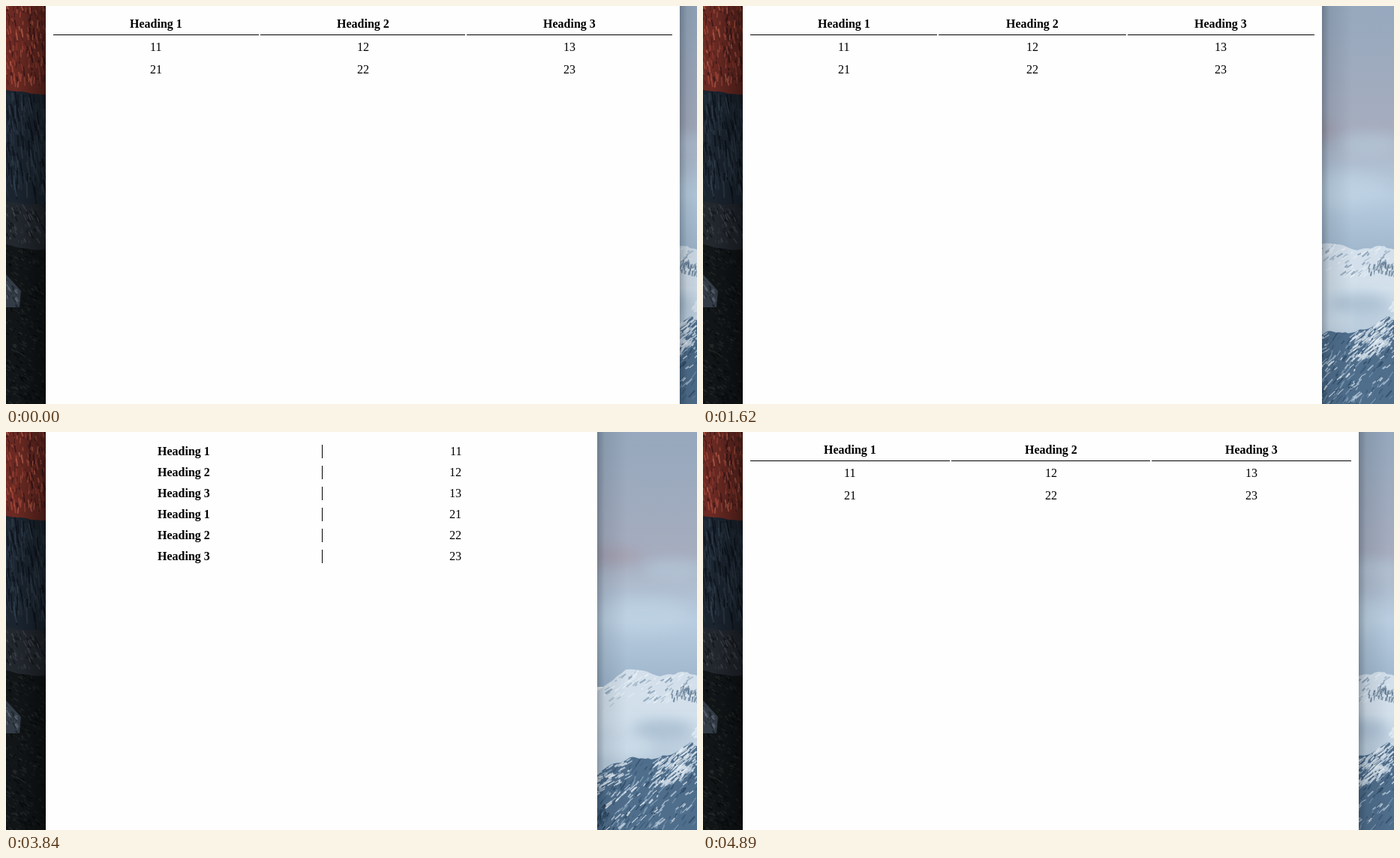
Recreate the animation shown at these times as an HTML page. Size 921 px wide and 531 px high, loop 4990 ms.

```html
<!DOCTYPE html>
<html lang="en">
<head>
<meta charset="utf-8">
<title>Responsive table</title>
<style>
  html, body { margin: 0; width: 100%; height: 100%; overflow: hidden; background: #fefefe; }
  svg { display: block; width: 921px; height: 531px; }
  text { font: 16px "Liberation Serif", "Times New Roman", serif; fill: #000; }
  .head { font-weight: bold; }
</style>
</head>
<body>
<svg id="stage" viewBox="0 0 921 531">
  <defs>
    <linearGradient id="sky" x2="0" y2="1">
      <stop offset="0" stop-color="#96a8bd"/>
      <stop offset=".48" stop-color="#a5adbe"/>
      <stop offset=".74" stop-color="#b8cde0"/>
      <stop offset="1" stop-color="#9db4ca"/>
    </linearGradient>
    <linearGradient id="mist" x2="0" y2="1">
      <stop offset="0" stop-color="#d5e2ed"/>
      <stop offset=".4" stop-color="#b7cadb"/>
      <stop offset="1" stop-color="#c9d9e6"/>
    </linearGradient>
    <linearGradient id="shadeR">
      <stop offset="0" stop-color="#0a1420" stop-opacity=".3"/>
      <stop offset=".25" stop-color="#0a1420" stop-opacity=".1"/>
      <stop offset="1" stop-color="#0a1420" stop-opacity="0"/>
    </linearGradient>
    <linearGradient id="shadeL" x1="1" x2="0">
      <stop offset="0" stop-opacity=".4"/>
      <stop offset="1" stop-opacity="0"/>
    </linearGradient>
    <filter id="soft" x="-50%" y="-50%" width="200%" height="200%"><feGaussianBlur stdDeviation="9"/></filter>
  </defs>
  <g id="photo"></g>
  <rect x="13" width="40" height="531" fill="url(#shadeL)"/>
  <rect id="shade" width="40" height="531" fill="url(#shadeR)"/>
  <rect id="page" x="53" height="531" fill="#fefefe"/>
  <g id="wide"></g>
  <g id="narrow"></g>
</svg>
<script>
const LOOP = 4990, LEFT = 63, BREAK = 820, BOTTOM = 531;

// [start time in ms, right edge of the window]
const steps = [
  [0, 898], [600, 875], [810, 860], [1020, 852], [1260, 843], [1440, 835], [1620, 825],
  [1850, 813], [2000, 808], [2150, 800], [2330, 793], [2460, 789], [2640, 786],
  [3840, 788], [3990, 796], [4130, 810], [4280, 827], [4490, 856], [4720, 870], [4890, 874]
];

const $ = id => document.getElementById(id);
const photo = $("photo"), wideTable = $("wide"), narrowTable = $("narrow");

function set(el, attrs) {
  for (const k in attrs) el.setAttribute(k, attrs[k]);
  return el;
}

function add(parent, tag, attrs) {
  return parent.appendChild(set(document.createElementNS("http://www.w3.org/2000/svg", tag), attrs));
}

function label(parent, y, content, cls = "") {
  const el = add(parent, "text", { y, class: cls });
  el.textContent = content;
  const half = el.getComputedTextLength() / 2;
  return center => set(el, { x: Math.round(center - half) });
}

let seed = 7;
const rand = (a, b) => {
  seed = (seed * 16807) % 2147483647;
  return a + (b - a) * seed / 2147483647;
};

// A jagged skyline through a few key points, filled down to the bottom.
function ridge(fill, rough, points) {
  let line = points;
  for (let n = 0; n < 3; n++, rough /= 2) {
    line = line.flatMap(([x, y], i) => {
      if (!i) return [[x, y]];
      const [px, py] = line[i - 1];
      return [[(x + px) / 2, (y + py) / 2 + rand(-rough, rough)], [x, y]];
    });
  }
  const end = points[points.length - 1][0];
  add(photo, "polygon", { fill, points: [...line, [end, BOTTOM], [points[0][0], BOTTOM]].join(" ") });
  return x => {
    const i = Math.max(1, line.findIndex(p => p[0] >= x));
    const [a, b] = [line[i - 1], line[i]];
    return a[1] + (b[1] - a[1]) * (x - a[0]) / (b[0] - a[0]);
  };
}

// Short strokes starting between x0 and x1, at a depth of up to `depth` under a skyline.
function grain(colors, count, x0, x1, top, depth, dx, dy) {
  for (let i = 0; i < count; i++) {
    const x = rand(x0, x1), y = top(x) + rand(0, depth), k = rand(0.3, 1);
    add(photo, "path", {
      d: `M${x} ${y}l${dx * k + rand(-2, 2)} ${dy * k}`,
      stroke: colors[i % colors.length], "stroke-width": rand(0.8, 2.4), opacity: 0.75
    });
  }
}

const puff = (cx, cy, rx, fill) =>
  add(photo, "ellipse", { cx, cy, rx, ry: rx * 0.36, fill, opacity: 0.75, filter: "url(#soft)" });

// Cliff bands: top, base colour, stroke colours, stroke lean and length.
const bands = [
  [-10, "#6b2a23", ["#a5483a", "#351518", "#8a3529", "#4a1b1a", "#c0614c"], 1, 12],
  [112, "#1b2530", ["#2f3d4b", "#0c121a", "#25323f"], 3, 24],
  [260, "#23282f", ["#474a50", "#10151b", "#303840"], 4, 9],
  [318, "#111517", ["#262b29", "#07090a", "#1b2120"], 5, 4]
];

function drawLeft() {
  bands.forEach(([y, base, colors, dx, dy], i) => {
    const top = ridge(base, 4, [[0, y], [54, y + 6]]);
    const depth = (bands[i + 1]?.[0] ?? BOTTOM) - y - dy;
    grain(colors, depth * 1.8, -2, 53, top, depth, dx, dy);
  });
  add(photo, "path", { d: "M0 358L20 380L18 402H0Z", fill: "#333c46" });
  grain(["#5a646f", "#1d242b"], 24, 0, 14, x => 364 + x, 22, 4, 9);
}

function drawRight() {
  add(photo, "rect", { x: 780, width: 141, height: 340, fill: "url(#sky)" });
  puff(812, 165, 34, "#a59eae");
  puff(890, 185, 40, "#b4c5d6");
  puff(850, 245, 60, "#bdd2e2");

  const far = ridge("#d3e0eb", 4, [[780, 352], [826, 317], [872, 326], [895, 321], [921, 325]]);
  grain(["#9db1c4", "#edf3f8", "#7f96ad", "#e3ecf4"], 90, 800, 921, far, 34, -9, 7);
  grain(["#627a92"], 40, 885, 921, x => far(x) + 24, 14, 1, -8);
  add(photo, "rect", { x: 780, y: 374, width: 141, height: 157, fill: "url(#mist)" });
  puff(815, 378, 44, "#cfdeea");
  puff(875, 398, 40, "#a3b9cd");
  puff(820, 420, 42, "#cfdeea");

  const near = ridge("#4f6e8c", 5, [[780, 460], [832, 434], [864, 436], [910, 416], [921, 419]]);
  grain(["#2d4963", "#87a2ba", "#3c5b78"], 240, 784, 925, near, 105, -7, 10);
  grain(["#e4edf4", "#c9d8e5"], 70, 784, 835, near, 28, -10, 6);
  grain(["#e4edf4", "#d0deea"], 150, 868, 925, near, 36, -10, 9);
  grain(["#e4edf4", "#b9ccdc"], 90, 800, 925, x => near(x) + 30, 60, -8, 8);
  grain(["#1b2c40", "#2d4963"], 40, 780, 804, () => 492, 36, -4, 8);
}

const rows = [11, 21].map(n => [n, n + 1, n + 2]);
const cols = [0, 1, 2].map(i => ({
  line: add(wideTable, "rect", { y: 38, height: 1 }),
  labels: [
    label(wideTable, 29, "Heading " + (i + 1), "head"),
    ...rows.map((r, j) => label(wideTable, 60 + 30 * j, r[i]))
  ]
}));
const pairs = rows.flat().map((n, i) => {
  const y = 28 * i;
  return {
    head: label(narrowTable, 31 + y, "Heading " + (i % 3 + 1), "head"),
    bar: add(narrowTable, "rect", { y: 17 + y, width: 1, height: 18 }),
    value: label(narrowTable, 31 + y, n)
  };
});

function layout(right) {
  const w = right - 10 - LEFT, wide = right > BREAK;
  set($("page"), { width: right - 53 });
  set($("shade"), { x: right });
  set(wideTable, { display: wide ? "inline" : "none" });
  set(narrowTable, { display: wide ? "none" : "inline" });
  const col = (w - 4) / 3;
  cols.forEach(({ line, labels }, i) => {
    const x = LEFT + i * (col + 2), start = Math.round(x);
    set(line, { x: start, width: Math.round(x + col) - start });
    labels.forEach(place => place(x + col / 2));
  });
  pairs.forEach(({ head, bar, value }) => {
    head(LEFT + w / 4 - 5.25);
    set(bar, { x: Math.round(LEFT + w / 2) });
    value(LEFT + w * 0.75);
  });
}

function frame() {
  const t = performance.now() % LOOP;
  layout(steps.findLast(s => s[0] <= t)[1]);
  requestAnimationFrame(frame);
}

drawLeft();
drawRight();
frame();
</script>
</body>
</html>
```
